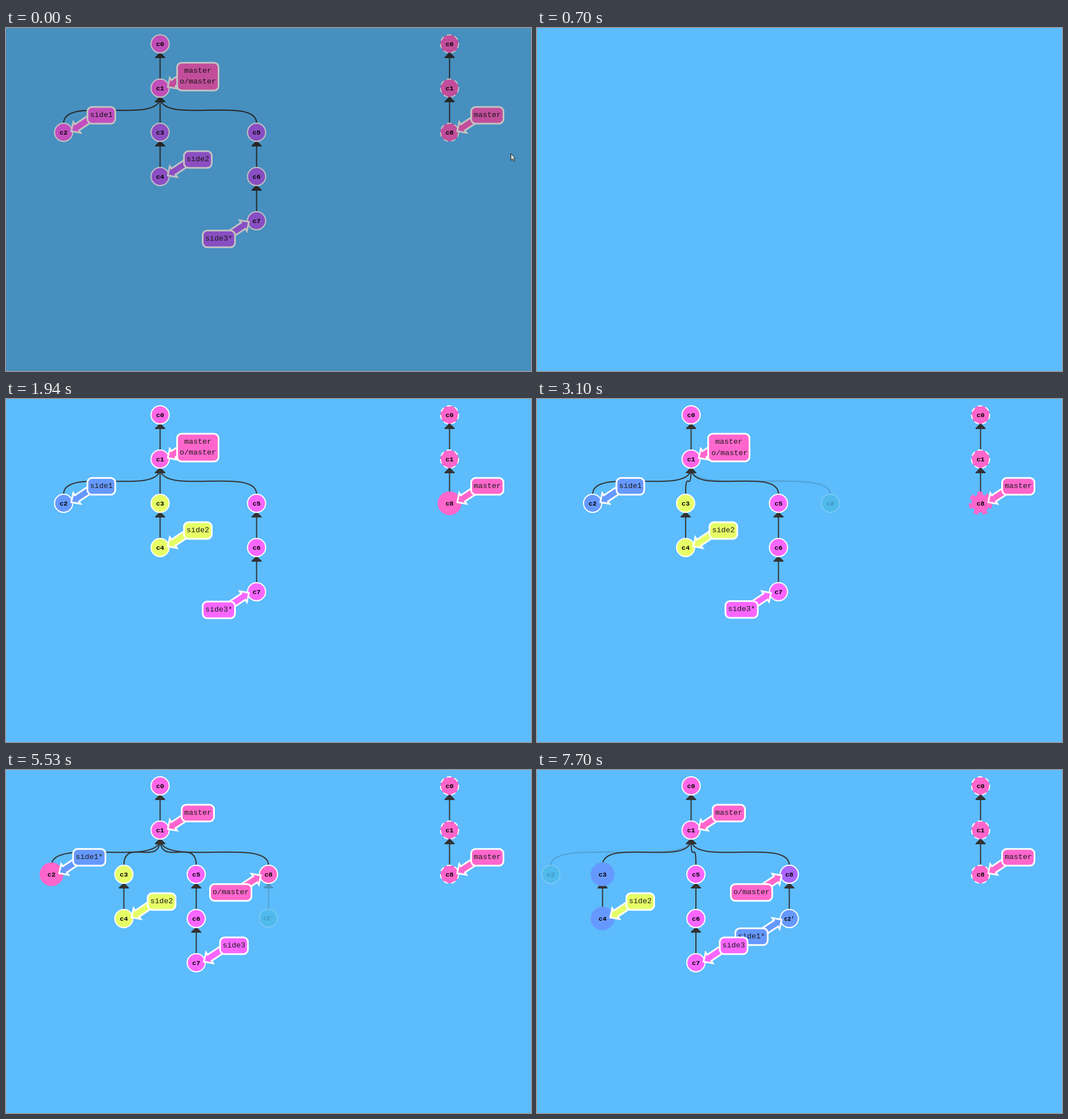
An HTML page with a canvas that plays this animation: 925x605 px, repeating every 8000 ms.

```html
<!DOCTYPE html>
<html lang="en">
<head>
<meta charset="utf-8">
<title>Commit tree</title>
<style>
  html, body { margin: 0; width: 100%; height: 100%; overflow: hidden; background: #5cbcfc; }
  canvas { display: block; }
</style>
</head>
<body>
<canvas id="stage" width="925" height="605"></canvas>
<script>
const canvas = document.getElementById('stage');
const ctx = canvas.getContext('2d');

const LOOP = 8000, TICKS = 103;   // the picture is held for one tick at a time
const FONT = '"Liberation Mono", "Courier New", monospace';
const WHITE = '#ffffff', INK = '#333333', TEAL = '#24b3b3';
const PINK = '#ff66cc', BLUE = '#6699ff', YELLOW = '#e6ff66', MAGENTA = '#f966ff';
const ROOT_X = 271.5, REMOTE_X = 781.5, R = 16;
const row = n => 28 + 78 * n;

const clamp = v => Math.max(0, Math.min(1, v));
const lerp = (a, b, p) => a + (b - a) * p;
const rgb = hex => [1, 3, 5].map(i => parseInt(hex.slice(i, i + 2), 16));
const hex = parts => '#' + parts.map(v => Math.round(v).toString(16).padStart(2, '0')).join('');

function mix(a, b, p) {
  const to = rgb(b);
  return hex(rgb(a).map((v, i) => lerp(v, to[i], p)));
}

function easeInOut(n) {
  if (n <= 0 || n >= 1) return clamp(n);
  const q = 0.48 - n / 1.04;
  const root = Math.sqrt(0.1734 + q * q);
  const t = Math.cbrt(root - q) + Math.cbrt(-root - q) + 0.5;
  return (1 - t) * 3 * t * t + t * t * t;
}

function bounce(n) {
  n = clamp(n);
  const s = 7.5625, p = 2.75;
  if (n < 1 / p) return s * n * n;
  if (n < 2 / p) return s * (n -= 1.5 / p) * n + 0.75;
  if (n < 2.5 / p) return s * (n -= 2.25 / p) * n + 0.9375;
  return s * (n -= 2.625 / p) * n + 0.984375;
}

// Link from a child up to its parent, ending in an arrow head
function edge(cx, cy, px, py, alpha = 1) {
  const y0 = cy - R, y1 = py + R, head = 8;
  ctx.globalAlpha = alpha;
  ctx.strokeStyle = ctx.fillStyle = INK;
  ctx.lineWidth = 2;
  ctx.lineJoin = 'round';
  ctx.beginPath();
  ctx.moveTo(cx, y0);
  ctx.bezierCurveTo(cx, y0 - 50, px, y1 + 50, px, y1);
  ctx.stroke();
  ctx.beginPath();
  ctx.moveTo(px, y1);
  ctx.lineTo(px - head, y1 + head);
  ctx.lineTo(px + head, y1 + head);
  ctx.closePath();
  ctx.fill();
  ctx.stroke();
  ctx.globalAlpha = 1;
}

function node(x, y, name, fill, { alpha = 1, glow = 0, glowColor = PINK, dash = false, r = R } = {}) {
  ctx.globalAlpha = alpha;
  ctx.fillStyle = mix(fill, glowColor, glow);
  ctx.strokeStyle = mix(WHITE, glowColor, glow);
  ctx.lineWidth = 2 + 8 * glow;
  ctx.setLineDash(dash ? [8, 6] : []);
  ctx.beginPath();
  ctx.arc(x, y, r, 0, 2 * Math.PI);
  ctx.fill();
  ctx.stroke();
  ctx.setLineDash([]);
  ctx.fillStyle = '#000';
  ctx.font = `bold ${name.length > 2 ? 10 : 11.8}px ${FONT}`;
  ctx.textAlign = 'center';
  ctx.fillText(name, x, y + 4);
  ctx.globalAlpha = 1;
}

// Branch tag; side runs from 1 (upper right of the node) to -1 (lower left)
function label(x, y, text, fill, { side = 1, chars = text.length, drop = 0, extra = 0, box = 1 } = {}) {
  const w = 8 * chars + 9, h = 29.5 + extra;
  const tx = x + 66.5 * side, ty = y - 31 * side + drop;
  const ux = 0.83, uy = -0.555;
  const at = (along, across) => [
    x + side * (13.5 + ux * along - uy * across),
    y + side * (-2 + uy * along + ux * across)
  ];
  const shape = [[45, -6.5], [12, -6.5], [12, -11.5], [0, 0], [12, 11.5], [12, 6.5], [45, 6.5]];

  if (box > 0) {
    ctx.globalAlpha = box;
    ctx.fillStyle = fill;
    ctx.strokeStyle = WHITE;
    ctx.lineWidth = 3;
    ctx.lineJoin = 'miter';
    ctx.beginPath();
    shape.forEach(([a, b]) => ctx.lineTo(...at(a, b)));
    ctx.closePath();
    ctx.fill();
    ctx.stroke();
    ctx.beginPath();
    ctx.roundRect(tx - w / 2, ty + 1 - 14.75, w, h, 8);
    ctx.fill();
    ctx.stroke();
    ctx.globalAlpha = 1;
  }
  ctx.fillStyle = '#1c1c1c';
  ctx.font = `13.33px ${FONT}`;
  ctx.textAlign = 'center';
  ctx.fillText(text, tx, ty + 4);
}

function pointer(x, y) {
  ctx.beginPath();
  [[0, 0], [0, 12], [2.7, 9.5], [4.6, 13.6], [6.6, 12.7], [4.8, 8.7], [8, 8.4]]
    .forEach(([dx, dy]) => ctx.lineTo(x + dx, y + dy));
  ctx.closePath();
  ctx.fillStyle = '#d4d4d4';
  ctx.strokeStyle = '#222';
  ctx.lineWidth = 1;
  ctx.fill();
  ctx.stroke();
}

function remoteTree(glow, dashed) {
  edge(REMOTE_X, row(1), REMOTE_X, row(0));
  edge(REMOTE_X, row(2), REMOTE_X, row(1));
  node(REMOTE_X, row(0), 'c0', PINK, { dash: true });
  node(REMOTE_X, row(1), 'c1', PINK, { dash: true });
  node(REMOTE_X, row(2), 'c8', PINK, { glow, dash: dashed });
  label(REMOTE_X, row(2), 'master', PINK);
}

function draw(f) {
  const tween = (a, b) => easeInOut(clamp((f - a) / (b - a)));
  const spread = tween(29.7, 35);   // room for the fetched commit
  const fetched = tween(39.6, 44.9);
  const picked = tween(62, 67);     // side1 becomes current
  const rebased = tween(71.6, 77);
  const born8 = bounce((f - 29.7) / 10.3);
  const born2 = bounce((f - 61.7) / 10.3);
  const glow8 = tween(18.5, 25) * (1 - fetched);
  const glow2 = tween(50.5, 57) * (1 - rebased);
  const glow3 = tween(82.5, 89);
  const glow4 = tween(92.5, 99);

  const place = (a, b, c, d) => lerp(lerp(lerp(a, b, spread), c, fetched), d, rebased);
  const x2 = place(101.5, 98.2, 80.2, 24.5);
  const x3 = place(ROOT_X, 262.5, 207.7, 115.5);
  const x5 = place(441.5, 426.5, 335.2, 280);
  const end8 = place(517.5, 517.5, 462.5, 444.5);
  const x8 = lerp(ROOT_X, end8, born8), y8 = lerp(row(1), row(2), born8);

  const old = f < 9;
  const root = old ? '#fc66f2' : '#ff66e6';
  const side1 = old ? '#ff66fa' : BLUE;
  const side2 = old ? '#b866ff' : YELLOW;
  const side3 = old ? '#b266ff' : MAGENTA;
  const fill8 = mix(mix(TEAL, PINK, fetched), '#ab66ff', rebased);
  const alpha2 = lerp(1, 0.2, rebased);
  const show8 = f >= 30, show2 = f >= 62;

  ctx.clearRect(0, 0, 925, 605);
  canvas.style.opacity = old ? 1 : 0.5 - Math.cos(Math.PI * clamp((f - 9) / 6)) / 2;

  edge(ROOT_X, row(1), ROOT_X, row(0));
  edge(x2, row(2), ROOT_X, row(1), alpha2);
  edge(x3, row(2), ROOT_X, row(1));
  edge(x3, row(3), x3, row(2));
  edge(x5, row(2), ROOT_X, row(1));
  edge(x5, row(3), x5, row(2));
  edge(x5, row(4), x5, row(3));
  if (show8) {
    edge(lerp(ROOT_X, end8, spread), lerp(row(1) + 2 * R, row(2), spread), ROOT_X, row(1),
      lerp(0.2 * spread, 1, fetched));
  }
  if (show2) {
    edge(x8, lerp(row(2) + 2 * R, row(3), picked), x8, row(2), lerp(0.2 * picked, 1, rebased));
    node(x8, lerp(row(2), row(3), born2), "c2'", mix(TEAL, BLUE, rebased),
      { alpha: lerp(0.2 * born2, 1, rebased), r: R * born2 });
  }

  node(ROOT_X, row(0), 'c0', root);
  node(x2, row(2), 'c2', mix(side1, TEAL, rebased), { alpha: alpha2, glow: glow2 });
  node(x3, row(2), 'c3', side2, { glow: glow3, glowColor: BLUE });
  node(x3, row(3), 'c4', side2, { glow: glow4, glowColor: BLUE });
  [2, 3, 4].forEach(n => node(x5, row(n), 'c' + (n + 3), side3));
  if (show8) node(x8, y8, 'c8', fill8, { alpha: lerp(0.2 * born8, 1, fetched), r: R * born8 });
  node(ROOT_X, row(1), 'c1', root);

  label(ROOT_X, row(1), 'master', PINK, { chars: lerp(8, 6, fetched), extra: lerp(19.5, 0, fetched) });
  label(lerp(ROOT_X, end8, fetched), lerp(row(1), row(2), fetched), 'o/master', PINK,
    { side: lerp(1, -1, fetched), drop: lerp(19, 0, fetched), box: fetched });
  label(lerp(x2, x8, rebased), lerp(row(2), row(3), rebased), show2 ? 'side1*' : 'side1', side1,
    { side: lerp(1, -1, rebased), chars: lerp(5, 6, picked) });
  label(x3, row(3), 'side2', side2);
  label(x5, row(4), show2 ? 'side3' : 'side3*', side3,
    { side: lerp(-1, 1, fetched), chars: lerp(6, 5, picked) });

  remoteTree(glow8, f < 19 || f >= 40);

  if (f < 4) {
    ctx.fillStyle = `rgba(0, 0, 0, ${0.24 * (1 - f / 4)})`;
    ctx.fillRect(0, 0, 925, 605);
  }
  if (f < 1) pointer(889.5, 221.5);
}

const start = performance.now();
function loop() {
  const t = (performance.now() - start) % LOOP;
  draw(Math.min(TICKS - 1, Math.floor((t + 11) * TICKS / LOOP)));
  requestAnimationFrame(loop);
}
loop();
</script>
</body>
</html>
```
